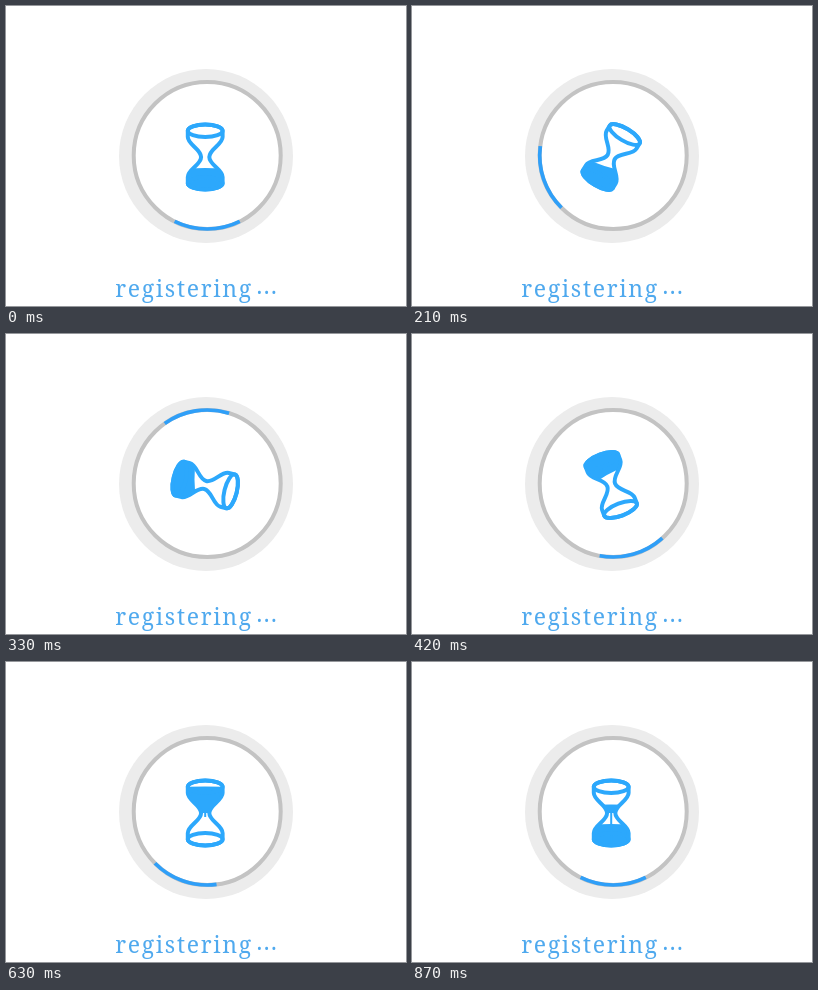
An HTML page that plays this animation: 400 px wide and 300 px high, repeating every 900 ms.

```html
<!DOCTYPE html>
<html lang="en">
<head>
<meta charset="utf-8">
<title>Registering</title>
<style>
  html, body { margin: 0; width: 100%; height: 100%; overflow: hidden; background: #fff; }
  svg { display: block; width: 400px; height: 300px; }
  text { font-family: "Noto Serif", serif; font-size: 23px; font-weight: 300; fill: #4fa9ee; }
  .line { fill: none; stroke: #2ca8fc; stroke-width: 4; stroke-linejoin: round; }
  .sand { fill: #2ca8fc; }
</style>
</head>
<body>
<svg viewBox="0 0 400 300">
  <defs>
    <path id="shell" d="M-17.4-26.2V-20C-17.4-12.5-4.1-8-4.1 0S-17.4 12.5-17.4 20V26.2A17.4 6.2 0 0 0 17.4 26.2V20C17.4 12.5 4.1 8 4.1 0S17.4-12.5 17.4-20V-26.2A17.4 6.2 0 0 0-17.4-26.2Z"/>
    <clipPath id="inside"><use href="#shell"/></clipPath>
  </defs>
  <circle cx="200" cy="150" r="87" fill="#ececec"/>
  <circle cx="201.2" cy="149.5" r="73.5" fill="#fff" stroke="#c3c3c3" stroke-width="4"/>
  <circle id="arc" cx="201.2" cy="149.5" r="73.5" fill="none" stroke="#2f9ff8" stroke-width="3.7"
    pathLength="360" stroke-dasharray="52.6 307.4"/>
  <g id="glass">
    <g clip-path="url(#inside)" class="sand">
      <path id="upper"/>
      <path id="lower"/>
      <path id="stream"/>
    </g>
    <g class="line">
      <use href="#shell"/>
      <ellipse cy="-26.2" rx="17.4" ry="6.2"/>
      <ellipse cy="26.2" rx="17.4" ry="6.2"/>
    </g>
  </g>
  <text x="109.2" y="291" letter-spacing="1.7">registering</text>
  <text x="250.6" y="287.5" letter-spacing="1.4">...</text>
</svg>
<script>
  const STEP = 30, COUNT = 30, SETTLED = 19;
  const el = id => document.getElementById(id);
  const arc = el('arc'), glass = el('glass');
  const upper = el('upper'), lower = el('lower'), stream = el('stream');

  // Keys are [step, degrees, slope]
  const orbit = [[0, 0, 0], [4, -37.5, 3], [7, 71, 75], [11, 531, 92], [17, 751.7, 8],
    [18.4, 757, 0], [21, 739, -10.5], [24.5, 710, 0], [29, 720, 0], [30, 720, 0]];
  const tilt = [[0, 0, 0], [4, -7, 4], [7, 31, 17.5], [11, 104, 18.5], [17, 186.5, 0], [19, 180, 0]];

  function hermite(keys, x) {
    const i = keys.findIndex(k => k[0] > x);
    if (i < 0) return keys[keys.length - 1][1];
    const [x0, y0, m0] = keys[i - 1], [x1, y1, m1] = keys[i];
    const w = x1 - x0, t = (x - x0) / w, s = 1 - t;
    return s * s * ((1 + 2 * t) * y0 + t * w * m0) + t * t * ((3 - 2 * t) * y1 - s * w * m1);
  }

  const fill = (top, bend, bottom) =>
    `M-24 ${top}Q0 ${top - 2 * bend} 24 ${top}V${bottom}H-24Z`;

  function draw(n) {
    arc.setAttribute('transform', `rotate(${90 - 26.3 + hermite(orbit, n)} 201.2 149.5)`);
    const flowing = n >= SETTLED;
    const angle = flowing ? 0 : hermite(tilt, n);
    const slosh = flowing ? 0 : -16 * Math.sin(Math.PI * n / SETTLED) ** 2;
    glass.setAttribute('transform', `translate(199.2 151) rotate(${angle})`);
    lower.setAttribute('transform', `rotate(${slosh} 0 11)`);
    if (flowing) {
      const p = (n - 21) / 8;
      const level = p < 0 ? -26 + 24 * p : -26 + 18 * p;
      upper.setAttribute('d', fill(level, 0.5, 0));
      lower.setAttribute('d', fill(34 - 22 * Math.max(p, 0), 1, 50));
      const end = Math.min(34, 4 + 14 * Math.max(n - 21, -0.3));
      stream.setAttribute('d', `M-1-1H1V${end}H-1Z`);
    } else {
      const bend = 1 - 3 * Math.min(1, n / 4);
      upper.setAttribute('d', '');
      stream.setAttribute('d', '');
      lower.setAttribute('d', fill(11 + bend, bend, 50));
    }
  }

  function tick() {
    draw(Math.floor(performance.now() / STEP) % COUNT);
    requestAnimationFrame(tick);
  }
  tick();
</script>
</body>
</html>
```
